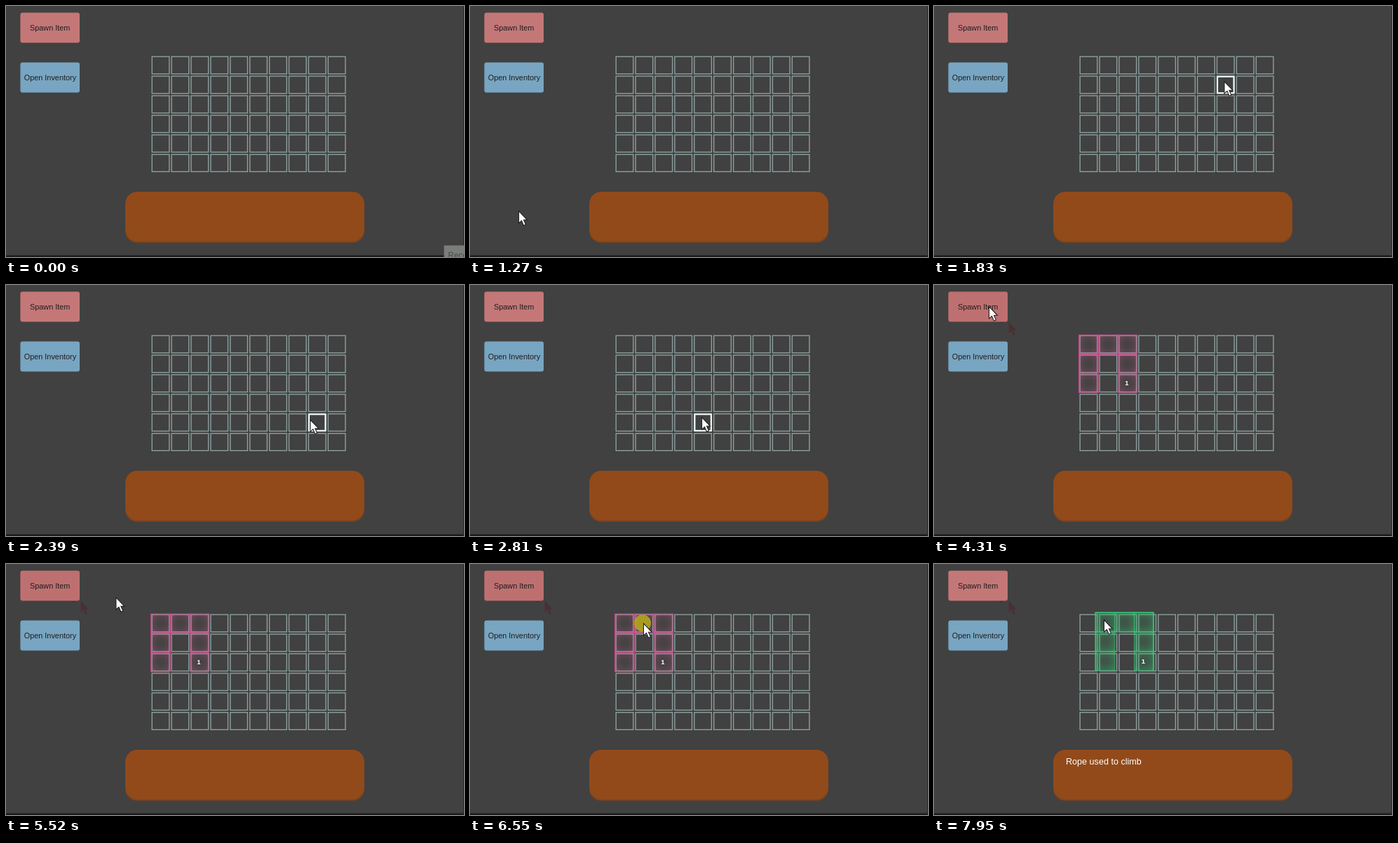
An HTML page that plays this animation: 653x358 px, repeating every 8000 ms.

```html
<!DOCTYPE html>
<html lang="en">
<head>
<meta charset="utf-8">
<title>Inventory grid</title>
<style>
  html, body { margin: 0; width: 100%; height: 100%; overflow: hidden; background: #414141; }
  svg { display: block; width: 100vw; height: 100vh; }
  text { font-family: "Liberation Sans", Arial, sans-serif; }
  .label { font-size: 10.9px; fill: #1e1e1e; text-anchor: middle; }
</style>
</head>
<body>
<svg viewBox="0 0 653 358">
  <defs>
    <radialGradient id="pinkGlow" r=".72">
      <stop offset=".2" stop-color="#d8588c" stop-opacity=".04"/>
      <stop offset=".6" stop-color="#d8588c" stop-opacity=".18"/>
      <stop offset="1" stop-color="#e0609a" stop-opacity=".48"/>
    </radialGradient>
    <radialGradient id="greenGlow" r=".72">
      <stop offset=".2" stop-color="#30b868" stop-opacity=".17"/>
      <stop offset=".6" stop-color="#30b868" stop-opacity=".35"/>
      <stop offset="1" stop-color="#35c878" stop-opacity=".55"/>
    </radialGradient>
    <path id="arrow" d="M0 0V16.2L3.8 12.8L6.6 19.3L9.4 18.1L6.6 11.8H11.4Z"/>
  </defs>
  <rect width="653" height="358" fill="#414141"/>
  <rect y="355.6" width="653" height="2.4" fill="#1b1b1b"/>
  <rect x="652" width="1" height="358" fill="#2c2c2c"/>

  <rect x="170" y="265" width="341" height="72.6" rx="17" fill="#82441a"/>
  <rect x="170.5" y="265" width="340" height="70.5" rx="17" fill="#924a1a"/>
  <text id="info" x="188" y="286" font-size="12.6" fill="#fff">Rope used to climb</text>

  <rect x="20.5" y="10" width="84.5" height="43" rx="3" fill="#6b4b4b"/>
  <rect id="spawn" x="20.5" y="9.5" width="84.5" height="42.7" rx="3"/>
  <text class="label" x="62.7" y="35">Spawn Item</text>
  <rect x="20.5" y="81" width="84.5" height="43" rx="3" fill="#4b5d69"/>
  <rect x="20.5" y="80.5" width="84.5" height="42.7" rx="3" fill="#78a5c1"/>
  <text class="label" x="62.9" y="106">Open Inventory</text>

  <g id="slots" fill="none" stroke="#8c9e9d" stroke-width="1.4"></g>
  <rect id="hover" width="23.4" height="23.4" fill="none" stroke="#f4ffff" stroke-width="2"/>
  <g id="item">
    <g id="cells" stroke-opacity=".6"></g>
    <path id="accent" fill="none" stroke-width="1.5"/>
    <text x="68" y="72.3" font-size="9.5" font-weight="bold" fill="#fff" text-anchor="middle">1</text>
  </g>

  <g id="trail" fill="#493033">
    <use href="#arrow" x="106.5" y="53"/>
    <rect x="94" y="53" width="4" height="1.5"/>
  </g>
  <circle id="click" cx="246" cy="84.3" r="12" fill="#b0a41e"/>
  <use id="cursor" href="#arrow" fill="#fff" stroke="#1c1c1c"/>
  <g id="tip">
    <rect x="624.5" y="341.5" width="32" height="20" fill="#7a7e7b"/>
    <text x="630" y="359.5" font-size="12" fill="#4a4c4a">Reco</text>
  </g>
</svg>
<script>
const LOOP = 8000, STEP = 70;
const COLS = 10, ROWS = 6, PITCH = 27.9, GRID_X = 207.5, GRID_Y = 71.5;
const ITEM_CELL = 27.6;
const $ = id => document.getElementById(id);

function set(el, attrs) {
  for (const k in attrs) el.setAttribute(k, attrs[k]);
}
function addRect(parent, x, y, size) {
  const el = document.createElementNS("http://www.w3.org/2000/svg", "rect");
  set(el, { x, y, width: size, height: size });
  parent.appendChild(el);
}
const show = (id, on) => set($(id), { visibility: on ? "visible" : "hidden" });

for (let r = 0; r < ROWS; r++)
  for (let c = 0; c < COLS; c++)
    addRect($("slots"), GRID_X + .7 + c * PITCH, GRID_Y + .7 + r * PITCH, 24.6);

// The item is an arch: a 3 by 3 block with its lower middle open
for (let r = 0; r < 3; r++)
  for (let c = 0; c < 3; c++)
    if (r === 0 || c !== 1) addRect($("cells"), c * ITEM_CELL, r * ITEM_CELL, ITEM_CELL);

const IDLE = { x: 207, y: 71, glow: "url(#pinkGlow)", line: "#e0489c", accent: "M0 0V83M0 27.4H82.5" };
const DRAG = { x: 230.3, y: 69.3, glow: "url(#greenGlow)", line: "#38c97a", accent: "M0 83V0H82.6V83" };

const linear = k => k;
const easeIn = k => k * k;
const easeOut = k => 1 - (1 - k) ** 1.4;
const smooth = k => k * k * (3 - 2 * k);

// Pointer sweeps: each curves from the previous end past `via` to `to`
const START = [55, 329];
const SWEEPS = [
  { at: 920, len: 770, via: [60, 240], to: [346, 141], ease: easeIn },
  { at: 1690, len: 840, via: [529, 32], to: [417, 220], ease: easeOut },
  { at: 2530, len: 840, via: [250, 170], to: [78, 30], ease: smooth },
  { at: 5100, len: 770, via: [130, 30], to: [242, 83], ease: smooth },
  { at: 5930, len: 140, via: [245, 83], to: [247, 84], ease: linear },
  { at: 6950, len: 70, via: [244, 81], to: [242, 79], ease: linear }
];

function pointer(t) {
  const i = SWEEPS.filter(s => s.at <= t).length - 1;
  if (i < 0) return null;
  const { at, len, via, to, ease } = SWEEPS[i];
  const from = i ? SWEEPS[i - 1].to : START;
  const u = ease(Math.min(1, Math.floor((t - at) / STEP) * STEP / len));
  return from.map((a, n) => (1 - u) ** 2 * a + 2 * u * (1 - u) * via[n] + u * u * to[n]);
}

function spawnColor(t) {
  if (t >= 4100 && t < 4240) return "#a25c5c";
  return t >= 3230 && t < 6620 ? "#be7070" : "#c47777";
}

function drawItem(t) {
  const s = t < 7950 ? IDLE : DRAG;
  show("item", t >= 4240);
  set($("item"), { transform: `translate(${s.x} ${s.y})` });
  set($("cells"), { fill: s.glow, stroke: s.line });
  set($("accent"), { d: s.accent, stroke: s.line });
}

function drawPointer(t) {
  const p = pointer(t);
  show("cursor", p);
  show("hover", false);
  if (!p) return;
  const [x, y] = p;
  set($("cursor"), { transform: `translate(${x + .5} ${y + .9}) scale(1.05)` });
  const c = Math.floor((x - GRID_X) / PITCH), r = Math.floor((y - GRID_Y) / PITCH);
  if (t < 4100 && c >= 0 && c < COLS && r >= 0 && r < ROWS) {
    show("hover", true);
    set($("hover"), { x: GRID_X + 1.3 + c * PITCH, y: GRID_Y + 1.3 + r * PITCH });
  }
}

function render(t) {
  show("tip", t < 70);
  show("trail", t >= 3300);
  show("info", t >= 6620);
  show("click", t >= 6550 && t < 6690);
  set($("click"), { opacity: t < 6620 ? .93 : .45 });
  set($("spawn"), { fill: spawnColor(t) });
  drawItem(t);
  drawPointer(t);
}

const start = performance.now();
function tick() {
  render((performance.now() - start) % LOOP);
  requestAnimationFrame(tick);
}
tick();
</script>
</body>
</html>
```
